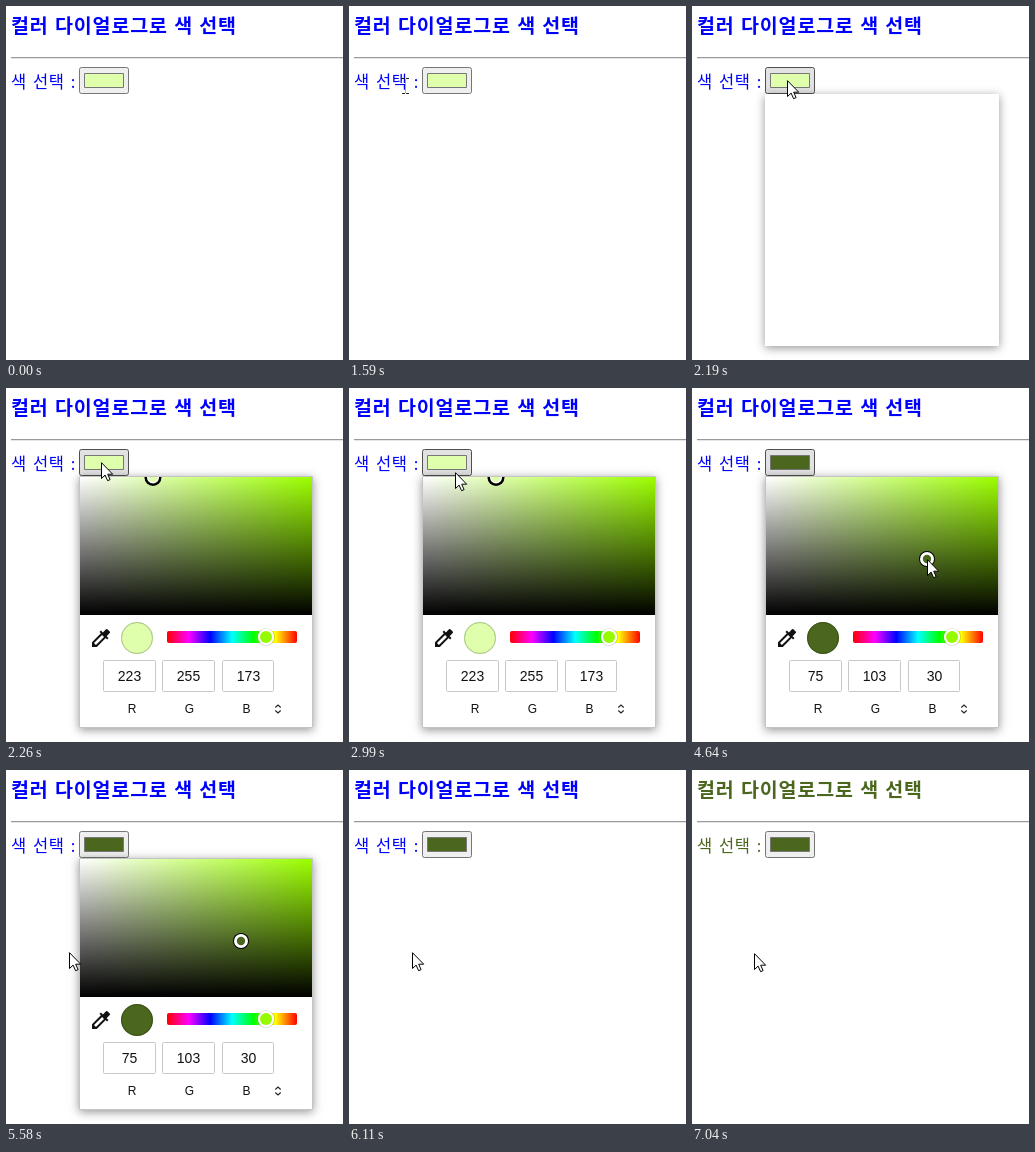
Write an HTML page with a canvas that moves like this. It is 337x354 px and loops after 7.7 s.

```html
<!DOCTYPE html>
<html lang="ko">
<head>
<meta charset="utf-8">
<title>컬러 다이얼로그로 색 선택</title>
<style>
  html, body { margin: 0; width: 100%; height: 100%; overflow: hidden; background: #fff; }
  canvas { display: block; }
</style>
</head>
<body>
<canvas id="stage" width="337" height="354"></canvas>
<script>
const ctx = document.getElementById('stage').getContext('2d');
const LOOP = 7700;
const KOREAN = '"Noto Sans CJK KR", "Noto Sans CJK", sans-serif';
const LATIN = '"Liberation Sans", sans-serif';

// Pointer trips: start, end, number of steps, then the points passed at even steps
const trips = [
  { t0: 1260, t1: 1790, n: 9, from: [3, 89], to: [95, 74], ease: p => p < 0.625 ? p * 0.922 : 0.576 + (p - 0.625) * 1.13 },
  { t0: 2990, t1: 3570, n: 8, from: [106, 84], to: [216, 136] },
  { t0: 4300, t1: 4640, n: 5, from: [220, 143], to: [235, 171] },
  { t0: 5300, t1: 5580, n: 5, from: [210, 173], to: [63, 182] },
  { t0: 7040, t1: 7040, n: 1, from: [62, 183], to: [62, 183] }
];

// Chosen colours: time, ring centre, saturation, value
const picks = [
  { t: 0, x: 147, y: 89.5, s: 0.3216, v: 1 },
  { t: 3570, x: 216, y: 136, s: 0.6095, v: 0.6627 },
  { t: 4640, x: 235, y: 171, s: 0.7087, v: 0.4039 }
];

const between = (t, a, b) => t >= a && t < b;
const rgb = c => `rgb(${c.join(',')})`;
const lastStarted = (list, t, key) => list.filter(e => t >= e[key]).pop();

function pickColor({ s, v }) {
  return [1 - s * 0.388, 1, 1 - s].map(k => Math.round(255 * v * k));
}

function pointerAt(t) {
  const trip = lastStarted(trips, t, 't0');
  if (!trip) return null;
  const { t0, t1, n, from, to, ease = p => p } = trip;
  const step = n > 1 ? Math.min(n - 1, Math.floor((t - t0 + 4) / (t1 - t0) * (n - 1))) : 0;
  const p = n > 1 ? ease(step / (n - 1)) : 1;
  return from.map((a, i) => Math.round(a + (to[i] - a) * p));
}

function box(x, y, w, h, fill, line, r = 0) {
  ctx.beginPath();
  ctx.roundRect(x + 0.5, y + 0.5, w - 1, h - 1, r);
  ctx.fillStyle = fill;
  ctx.fill();
  ctx.strokeStyle = line;
  ctx.lineWidth = 1;
  ctx.stroke();
}

function disc(x, y, r, fill) {
  ctx.beginPath();
  ctx.arc(x, y, r, 0, Math.PI * 2);
  ctx.fillStyle = fill;
  ctx.fill();
}

function write(str, x, y, font, color, align = 'left', spacing = 0, gap = 0) {
  ctx.font = font;
  ctx.fillStyle = color;
  ctx.textAlign = align;
  ctx.letterSpacing = spacing + 'px';
  ctx.wordSpacing = gap + 'px';
  ctx.fillText(str, x, y);
}

function gradient(x0, y0, x1, y1, colors) {
  const g = ctx.createLinearGradient(x0, y0, x1, y1);
  colors.forEach((c, i) => g.addColorStop(i / (colors.length - 1), c));
  return g;
}

function drawPage(color, swatch, hover) {
  ctx.fillStyle = '#fff';
  ctx.fillRect(0, 0, 337, 354);
  write('컬러 다이얼로그로 색 선택', 5, 27, `bold 19.5px ${KOREAN}`, color, 'left', 0.9, 0.9);
  ctx.fillStyle = '#9a9a9a';
  ctx.fillRect(5, 51, 332, 1);
  ctx.fillStyle = '#e6e6e6';
  ctx.fillRect(5, 52, 332, 1);
  write('색 선택 :', 5, 82, `300 16.5px ${KOREAN}`, color, 'left', 0.8, 1.4);
  box(73, 61, 50, 27, hover ? '#e2e2e2' : '#efefef', hover ? '#4f4f4f' : '#767676', 2);
  box(78, 67, 40, 15, swatch, '#777');
}

function drawRing({ x, y }, color, bold) {
  disc(x, y, bold ? 8.5 : 8, '#000');
  disc(x, y, bold ? 6 : 7, '#fff');
  disc(x, y, bold ? 4.5 : 4.2, color);
}

const dropper = new Path2D('M20.7 5.6l-2.3-2.3a1 1 0 0 0-1.4 0l-3.1 3.1-2-1.9-1.4 1.4 1.4 1.4L3 16.2V21h4.8l8.9-8.9 1.4 1.4 1.4-1.4-1.9-1.9 3.1-3.1a1 1 0 0 0 0-1.5zM6.9 19L5 17.1 13.1 9 15 10.9z');

function drawPanel(pick, channels, full, boldRing) {
  ctx.save();
  ctx.shadowColor = 'rgba(0,0,0,0.42)';
  ctx.shadowBlur = 9;
  ctx.shadowOffsetY = 2;
  ctx.fillStyle = '#fff';
  ctx.fillRect(73, 88, 234, 252);
  ctx.restore();
  if (!full) return;

  box(73, 88, 234, 252, '#fff', '#c4c4c4');
  const color = rgb(channels);

  ctx.save();
  ctx.beginPath();
  ctx.rect(74, 89, 232, 138);
  ctx.clip();
  for (const fill of [
    gradient(74, 0, 306, 0, ['#fff', 'rgb(156,255,0)']),
    gradient(0, 89, 0, 227, ['rgba(0,0,0,0)', '#000'])
  ]) {
    ctx.fillStyle = fill;
    ctx.fillRect(74, 89, 232, 138);
  }
  drawRing(pick, color, boldRing);
  ctx.restore();

  ctx.save();
  ctx.translate(83, 238);
  ctx.fillStyle = '#111';
  ctx.fill(dropper);
  ctx.restore();

  disc(131, 250, 16, 'rgba(0,0,0,0.25)');
  disc(131, 250, 16, color);
  ctx.strokeStyle = 'rgba(0,0,0,0.22)';
  ctx.lineWidth = 1;
  ctx.beginPath();
  ctx.arc(131, 250, 15.5, 0, Math.PI * 2);
  ctx.stroke();

  ctx.fillStyle = gradient(161, 0, 291, 0, ['#f00', '#f0f', '#00f', '#0ff', '#0f0', '#ff0', '#f00']);
  ctx.beginPath();
  ctx.roundRect(161, 243, 130, 12, 2);
  ctx.fill();
  disc(260, 249, 8.8, 'rgba(0,0,0,0.18)');
  disc(260, 249, 8.2, '#fff');
  disc(260, 249, 6, 'rgb(150,250,0)');

  [97, 156, 216].forEach((x, i) => {
    box(x, 272, i === 2 ? 52 : 53, 32, '#fff', '#c8c8c8', 1);
    write(String(channels[i]), x + 26.5, 293, `14px ${LATIN}`, '#111', 'center');
    write('RGB'[i], [126, 183.5, 240.5][i], 325, `12px ${LATIN}`, '#111', 'center');
  });

  ctx.strokeStyle = '#222';
  ctx.lineWidth = 1.1;
  for (const dir of [-1, 1]) {
    ctx.beginPath();
    ctx.moveTo(269.3, 321 + dir * 1.5);
    ctx.lineTo(272, 321 + dir * 4);
    ctx.lineTo(274.7, 321 + dir * 1.5);
    ctx.stroke();
  }
}

const arrow = new Path2D('M.5.7V16.5L4.1 13.1 6.6 18.7 9.1 17.6 6.7 12.2H11.7Z');

function drawPointer([x, y], t) {
  ctx.save();
  ctx.translate(x, y);
  const overText = t < 1790 && x > 5 && x < 70 && y < 88;
  if (overText) {
    ctx.fillStyle = '#f0a020';
    ctx.fillRect(0, -7, 1, 14);
    ctx.fillStyle = '#222';
    for (const top of [-8, 7]) {
      ctx.fillRect(-3, top, 3, 1);
      ctx.fillRect(1, top, 3, 1);
    }
  } else {
    ctx.fillStyle = '#fff';
    ctx.fill(arrow);
    ctx.strokeStyle = '#000';
    ctx.lineWidth = 1;
    ctx.stroke(arrow);
  }
  ctx.restore();
}

function draw(t) {
  const pick = lastStarted(picks, t, 't');
  const channels = pickColor(pick);
  const color = rgb(channels);
  drawPage(t < 6240 ? '#00f' : color, color, between(t, 1790, 5300));
  if (between(t, 2190, 6110)) {
    const bold = t < 3570 || between(t, 3770, 4640) || between(t, 4840, 5300);
    drawPanel(pick, channels, t >= 2260, bold);
  }
  const pointer = pointerAt(t);
  if (pointer) drawPointer(pointer, t);
}

const start = performance.now();
function tick() {
  draw((performance.now() - start) % LOOP);
  requestAnimationFrame(tick);
}
tick();
</script>
</body>
</html>
```
